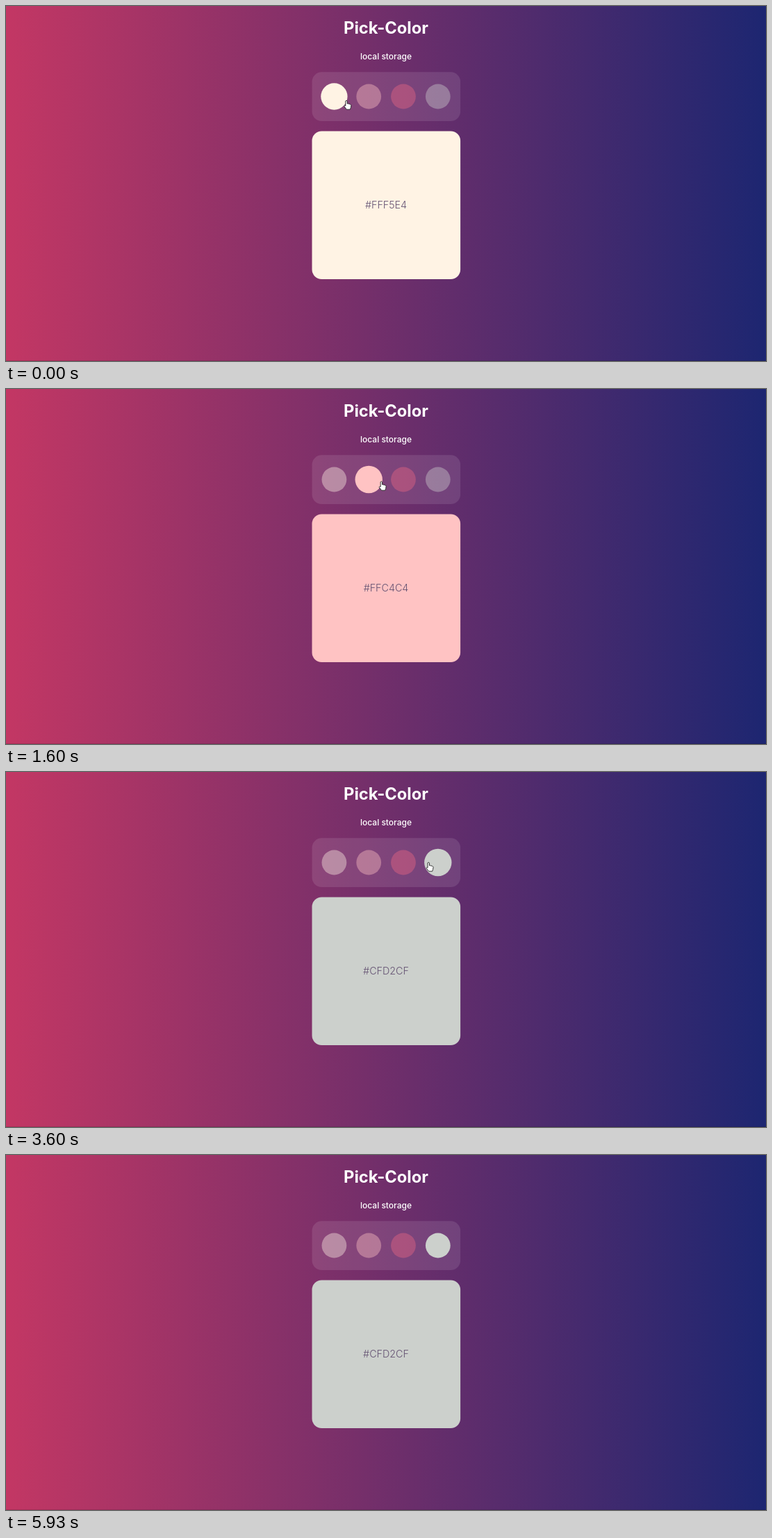
Write an HTML page that moves like this. It is 1094x512 px and loops after 6390 ms.

```html
<!DOCTYPE html>
<html lang="en">
<head>
<meta charset="utf-8">
<title>Pick-Color</title>
<style>
  html, body { margin: 0; width: 100%; height: 100%; overflow: hidden; }
  body { background: linear-gradient(to right, #c33764, #1d2671); }
  svg { display: block; width: 100%; height: 100%; }
  text { font-family: Inter, "Open Sans", sans-serif; text-anchor: middle; fill: #fff; }
  #title { font-size: 23.7px; font-weight: 700; }
  #subtitle { font-size: 12px; font-weight: 500; }
  #code { font-size: 14.3px; font-weight: 300; fill: #645272; }
</style>
</head>
<body>
<svg viewBox="0 0 1094 512">
  <text id="title" x="547" y="39.5">Pick-Color</text>
  <text id="subtitle" x="547" y="76.5">local storage</text>
  <rect x="440.5" y="95.3" width="213.6" height="70.8" rx="14" fill="#fff" fill-opacity=".105"/>
  <g id="swatches"></g>
  <rect id="card" x="440.5" y="180.5" width="213.6" height="213.5" rx="14"/>
  <text id="code" x="547" y="292.3"></text>
  <rect y="511" width="1094" height="1" fill-opacity=".15"/>
  <circle id="ring" fill="#888" fill-opacity=".2" stroke="#777"/>
  <g id="pointer" stroke-linejoin="round">
    <path id="hand" fill="#fff" stroke="#222" stroke-width=".9"
      d="M-1.2 1Q0-.4 1.2 1V5Q2.5 4.3 3.5 5.3Q4.8 4.8 5.4 6Q6.8 6 6.8 7.5L6.3 10.5L5.4 13.2H.2L-3.2 8.6Q-3 7-1.2 8Z"/>
    <path id="arrow" fill="#111" stroke="#fff" stroke-width=".9"
      d="M0 0V11L2.6 8.6 4.3 12.6 6 11.9 4.3 8H8Z"/>
  </g>
</svg>
<script>
const LOOP = 6390, START = 130, STEP = 1000 / 15, LAST = 5930;
const FADE = 400, DIM = 0.4, GROW = 1.1;
const RADIUS = 17.9, ROW_Y = 130.5;
const $ = id => document.getElementById(id);

// Each track lists [time, new goal]; the first entry is the starting value.
const colors = [
  { code: '#FFF5E4', fill: '#fff3e4',
    size: [[0, 1.07], [130, 1], [4515, GROW], [5220, 1]],
    opacity: [[0, 1], [860, DIM], [4515, 1], [5220, DIM]] },
  { code: '#FFC4C4', fill: '#ffc3c3',
    size: [[0, 1], [320, GROW], [1600, 1], [4000, GROW], [4420, 1]],
    opacity: [[0, DIM], [320, 1], [2190, DIM], [4000, 1], [4420, DIM]] },
  { code: '#EE6983', fill: '#ee6882',
    size: [[0, 1], [1680, GROW], [2800, 1], [3720, GROW], [3960, 1]],
    opacity: [[0, DIM], [1680, 1], [3260, DIM], [3720, 1], [3960, DIM]] },
  { code: '#CFD2CF', fill: '#ccd0cc',
    size: [[0, 1], [2790, GROW], [3640, 1]],
    opacity: [[0, DIM], [2790, 1]] },
];
const picks = [[0, 0], [860, 1], [2190, 2], [3260, 3]];
const clicks = [863, 2196, 3196];
const pointerPath = [
  [0, 490, 136], [130, 490, 136], [330, 504, 134], [600, 512, 133], [1450, 512, 133],
  [1600, 541, 133], [1680, 553, 133], [1900, 568, 133], [2680, 568, 133],
  [2790, 603, 131], [2950, 619, 130], [3460, 619, 130], [3600, 608, 130],
  [3720, 592, 130], [3960, 552, 130], [4000, 541, 130], [4420, 502, 129],
  [4515, 478, 129], [4530, 474.5, 129], [5130, 476, 129], [5220, 492, 120],
  [5400, 963, 59], [5467, 976, 15],
];
const POINTER_END = 5530;

const centerX = i => 472.4 + 49.8 * i;
const lerp = (a, b, p) => a + (b - a) * p;
const clamp = p => Math.min(1, Math.max(0, p));

// CSS "ease": cubic-bezier(.25, .1, .25, 1)
function ease(x) {
  const bezier = (a, b, u) => 3 * a * u * (1 - u) ** 2 + 3 * b * u * u * (1 - u) + u ** 3;
  let low = 0, high = 1;
  for (let i = 0; i < 16; i++) {
    const mid = (low + high) / 2;
    if (bezier(0.25, 0.25, mid) < x) low = mid; else high = mid;
  }
  return bezier(0.1, 1, low);
}

function follow(track, t) {
  let [start, goal] = track[0], from = goal;
  const valueAt = time => lerp(from, goal, ease(clamp((time - start) / FADE)));
  for (const [time, next] of track.slice(1)) {
    if (time > t) break;
    from = valueAt(time);
    start = time;
    goal = next;
  }
  return valueAt(t);
}

function pointerAt(t) {
  const i = pointerPath.findIndex(point => point[0] > t);
  if (i < 0) return pointerPath.at(-1).slice(1);
  const [t0, x0, y0] = pointerPath[i - 1], [t1, x1, y1] = pointerPath[i];
  const p = (t - t0) / (t1 - t0);
  return [lerp(x0, x1, p), lerp(y0, y1, p)];
}

function set(node, attributes) {
  for (const name in attributes) node.setAttribute(name, attributes[name]);
}

const swatches = colors.map(({ fill }, i) => {
  const circle = document.createElementNS('http://www.w3.org/2000/svg', 'circle');
  set(circle, { cx: centerX(i), cy: ROW_Y, fill });
  return $('swatches').appendChild(circle);
});

function draw(t) {
  colors.forEach(({ size, opacity }, i) => set(swatches[i], {
    r: RADIUS * follow(size, t), opacity: follow(opacity, t),
  }));

  const picked = colors[picks.findLast(pick => pick[0] <= t)[1]];
  set($('card'), { fill: picked.fill });
  $('code').textContent = picked.code;

  const [x, y] = pointerAt(t);
  const overSwatch = colors.some((_, i) => Math.hypot(x - centerX(i), y - ROW_Y) < 20);
  set($('pointer'), { transform: `translate(${x} ${y})`, opacity: t < POINTER_END ? 1 : 0 });
  set($('hand'), { opacity: overSwatch ? 1 : 0 });
  set($('arrow'), { opacity: overSwatch ? 0 : 1 });

  const age = t - (clicks.findLast(time => time <= t) ?? -LOOP);
  set($('ring'), { cx: x, cy: y + 0.5, r: 2.5 + Math.min(age, 200) * 0.02,
    opacity: clamp(1 - age / 200) });
}

function stepTime(t) {
  if (t < START) return 0;
  return Math.min(LAST, START + STEP * Math.floor((t - START + 4) / STEP));
}

const began = performance.now();
function tick() {
  draw(stepTime((performance.now() - began) % LOOP));
  requestAnimationFrame(tick);
}
tick();
</script>
</body>
</html>
```
